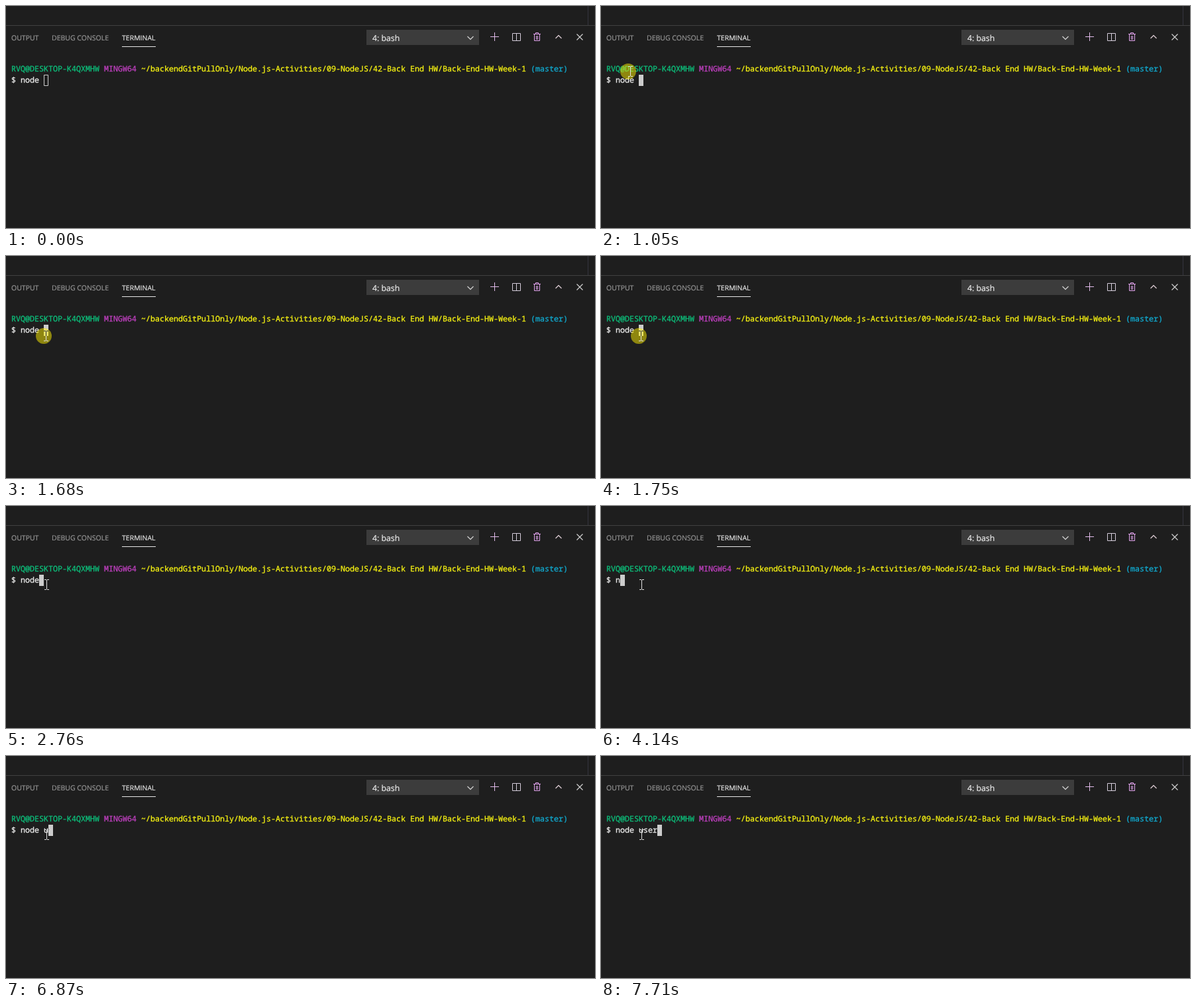
An HTML page with a canvas that plays this animation: 889 px wide and 336 px high, repeating every 8 s.

```html
<!DOCTYPE html>
<html lang="en">
<head>
<meta charset="utf-8">
<title>Terminal</title>
<style>
html, body { margin: 0; width: 100%; height: 100%; overflow: hidden; background: #1e1e1e; }
canvas { display: block; }
</style>
</head>
<body>
<canvas id="stage" width="889" height="336"></canvas>
<script>
const ctx = document.getElementById('stage').getContext('2d');
const LOOP = 8000, CELL = 7, ROW = 17, LEFT = 8, TOP = 87;
const UI = '"Open Sans", sans-serif';
const MONO = '11.667px "Noto Sans Mono", monospace';

const prompt = [
  ['RVQ@DESKTOP-K4QXMHW ', '#0dbc79'],
  ['MINGW64 ', '#bc3fbc'],
  ['~/backendGitPullOnly/Node.js-Activities/09-NodeJS/42-Back End HW/Back-End-HW-Week-1 ', '#f2ee12'],
  ['(master)', '#11a8cd']
];

// time, length of the typed command
const typing = [[0, 5], [2760, 4], [2910, 3], [3060, 2], [3130, 1], [3300, 0], [4140, 1], [4360, 2],
  [4610, 3], [4760, 4], [4910, 5], [6870, 6], [7240, 7], [7490, 8], [7710, 9]];

// time, x, y of the pointer once it has arrived
const moves = [[880, 44, 102], [980, 44, 99], [1200, 46, 112], [1420, 48, 114], [1490, 52, 117],
  [1570, 56, 120], [1640, 60, 121], [1970, 61, 119]];

const latest = (list, t) => list.filter(k => k[0] <= t).pop();
const within = (t, a, b) => t >= a && t < b;

function rect(x, y, w, h, color) {
  ctx.fillStyle = color;
  ctx.fillRect(x, y, w, h);
}

// A hairline outline gives the glyphs their slightly heavy look
function glyphs(text, x, y, font, color, weight) {
  ctx.font = font;
  ctx.fillStyle = ctx.strokeStyle = color;
  ctx.lineWidth = weight;
  ctx.fillText(text, x, y);
  ctx.strokeText(text, x, y);
}

function label(text, x, y, size, color) {
  glyphs(text, x, y, `${size}px ${UI}`, color, 0.2);
}

function stroke(path, color, width = 1) {
  ctx.strokeStyle = color;
  ctx.lineWidth = width;
  ctx.stroke(new Path2D(path));
}

// Writes text on the character grid and returns the next column
function write(text, col, row, color) {
  for (const c of text) glyphs(c, LEFT + CELL * col++, TOP + ROW * row + 12, MONO, color, 0.35);
  return col;
}

function drawPanel() {
  rect(0, 0, 889, 336, '#1e1e1e');
  rect(878, 0, 1, 29, '#34343e');
  rect(0, 29, 889, 1, '#414141');
  label('OUTPUT', 8, 52, 10.5, '#979797');
  label('DEBUG CONSOLE', 69, 52, 10.5, '#979797');
  label('TERMINAL', 175, 52, 10.5, '#e7e7e7');
  rect(175, 61, 51, 1, '#e7e7e7');

  rect(544, 36, 170, 23, '#3c3c3c');
  label('4: bash', 553, 53, 12.3, '#f0f0f0');
  stroke('M696.5 46l4.5 4.5 4.5-4.5', '#d0d0d0', 1.2);

  stroke('M731 46.5h13M737.5 40v13', '#e2bcec');
  stroke('M764.5 41.5h12v11h-12zM770.5 41v12', '#d4ccda');
  stroke('M796 42.5h11M799.5 42v-1.5h4v1.5M797.5 43v9.5h8V43M800.5 45v6M802.5 45v6', '#e2a4ee');
  stroke('M829.5 49l4.5-4.5 4.5 4.5', '#d9c9cf', 1.3);
  stroke('M861.5 42.5l9 9M870.5 42.5l-9 9', '#d0d0d0', 1.2);
}

function pointer(t) {
  if (t >= 880) return latest(moves, t).slice(1);
  const step = Math.floor((t - 140) / 74 + 0.05) / 10;
  const p = step * step * (3 - 2 * step);
  return [Math.round(717 - 673 * p), Math.round(320 - 218 * p)];
}

function beam(x, y, color) {
  rect(x, y - 7, 1, 14, color);
  for (const dy of [-8, 7]) {
    rect(x - 3, y + dy, 3, 1, color);
    rect(x + 1, y + dy, 3, 1, color);
  }
}

function draw(t) {
  drawPanel();
  prompt.reduce((col, [text, color]) => write(text, col, 0, color), 0);
  const length = latest(typing, t)[1];
  write('$ ' + 'node user'.slice(0, length), 0, 1, '#e5e5e5');

  const cx = LEFT + CELL * (length + 2), cy = TOP + ROW;
  const focused = t >= 1050;
  if (focused) rect(cx, cy, CELL, ROW, '#cccccc');
  else stroke(`M${cx + 0.5} ${cy + 0.5}h6v16h-6z`, '#cccccc');

  if (within(t, 1200, 1680)) {
    rect(43, TOP, 826, ROW, 'rgba(255,255,255,.25)');
    rect(LEFT, cy, 35, ROW, 'rgba(255,255,255,.25)');
  }

  if (t < 140) return;
  const [x, y] = pointer(t);
  if (within(t, 980, 1420) || within(t, 1680, 1900)) {
    ctx.fillStyle = 'rgba(255,240,0,.5)';
    ctx.beginPath();
    ctx.arc(x - 3, y, 12, 0, 7);
    ctx.fill();
  }
  beam(x, y, '#e1e1e1');
  if (!focused) return;
  // The pointer turns dark over the block cursor
  ctx.save();
  ctx.beginPath();
  ctx.rect(cx, cy, CELL, ROW);
  ctx.clip();
  beam(x, y, '#333333');
  ctx.restore();
}

ctx.textRendering = 'geometricPrecision';
ctx.lineJoin = 'round';
function tick() {
  draw(performance.now() % LOOP);
  requestAnimationFrame(tick);
}
tick();
</script>
</body>
</html>
```
